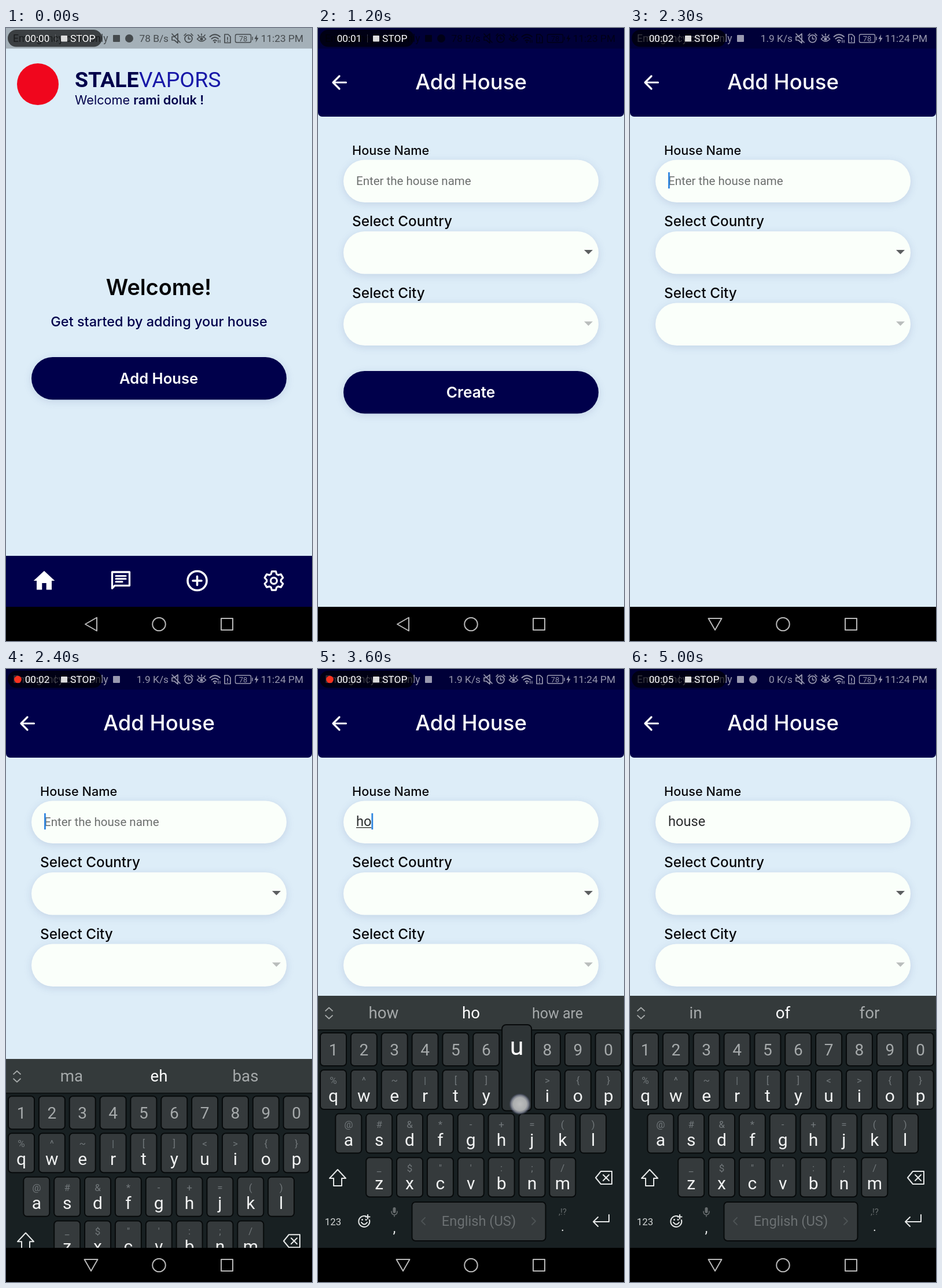
An HTML page that plays this animation: 529x1058 px, repeating every 5100 ms.

```html
<!DOCTYPE html>
<html lang="en">
<head>
<meta charset="utf-8">
<title>Add a house</title>
<style>
  html, body { margin: 0; width: 100%; height: 100%; overflow: hidden; background: #ddedf8; }
  svg { display: block; width: 529px; height: 1058px; }
  text { white-space: pre; }
  .ui { font-family: Inter, "Open Sans", sans-serif; }
  .ro { font-family: Roboto, "Noto Sans", sans-serif; }
  .mid { text-anchor: middle; }
  .end { text-anchor: end; }
  .w5 { font-weight: 500; }
  .w6 { font-weight: 600; }
  .w7 { font-weight: 700; }
  .line { fill: none; stroke-linecap: round; stroke-linejoin: round; }
  .shade { filter: drop-shadow(0 3px 7px rgba(20, 30, 110, .12)); }
</style>
</head>
<body>
<svg id="stage" viewBox="0 0 529 1058"></svg>
<script>
const LOOP = 5100, STEP = 100;
const NAVY = '#00004b', SKY = '#ddedf8', PAPER = '#fafffa';

const esc = s => s.replace(/&/g, '&amp;').replace(/</g, '&lt;');
const text = (s, x, y, size, cls, fill) =>
  `<text x="${x}" y="${y}" font-size="${size}" class="${cls}" fill="${fill}">${esc(s)}</text>`;
const rect = (x, y, w, h, r, fill, more = '') =>
  `<rect x="${x}" y="${y}" width="${w}" height="${h}" rx="${r}" fill="${fill}" ${more}/>`;
const disc = (x, y, r, fill) => `<circle cx="${x}" cy="${y}" r="${r}" fill="${fill}"/>`;
const line = (d, color, w = 2) => `<path class="line" d="${d}" stroke="${color}" stroke-width="${w}"/>`;
const ring = (x, y, r, color, w) =>
  `<circle class="line" cx="${x}" cy="${y}" r="${r}" stroke="${color}" stroke-width="${w}"/>`;

const pill = (y, fill) => rect(44, y, 441, 73.5, 36.7, fill, 'class="shade"');

// Six-toothed cog outline
function cog(cx, cy) {
  const pts = [];
  for (let i = 0; i < 6; i++)
    for (const [off, r] of [[-23, 12.4], [-12, 16.6], [12, 16.6], [23, 12.4]]) {
      const a = (i * 60 - 90 + off) * Math.PI / 180;
      pts.push((cx + r * Math.cos(a)).toFixed(1) + ' ' + (cy + r * Math.sin(a)).toFixed(1));
    }
  return line('M' + pts.join('L') + 'Z', '#fff', 3.2) + ring(cx, cy, 5.4, '#fff', 3.2);
}

function homePage() {
  return rect(0, 0, 529, 1000, 0, SKY) +
    disc(55, 97, 36, '#f0061d') +
    `<text x="119" y="102" font-size="37.5" class="ro" fill="${NAVY}"><tspan class="w7">STALE</tspan><tspan fill="#1818a8">VAPORS</tspan></text>` +
    `<text x="119" y="132" font-size="21.7" class="ui" fill="${NAVY}">Welcome <tspan class="w6">rami doluk !</tspan></text>` +
    text('Welcome!', 264, 461, 37.8, 'ui w6 mid', '#050508') +
    text('Get started by adding your house', 264.5, 515, 23.5, 'ui w5 mid', NAVY) +
    `<g id="addBtn">${pill(568, NAVY)}${text('Add House', 264, 614, 25.6, 'ui w6 mid', '#fff')}</g>` +
    rect(0, 911, 529, 88, 0, NAVY) +
    '<path d="M66 937L84.300 954H79V969.500H69.700V958H62.300V969.500H53V954H47.700Z" fill="#fff"/>' +
    line('M183.500 967V939H213.500V962.300H188Z', '#fff', 3.3) +
    line('M190 945.700H207M190 950.700H207M190 955.700H201', '#fff', 3.1) +
    ring(330.5, 954, 16.5, '#fff', 3.6) + line('M330.500 946.500V961.500M323 954H338', '#fff', 3.6) +
    cog(463, 954);
}

function formPage() {
  const label = (s, y, size) => text(s, 59, y, size, 'ui w5', '#08080c');
  const arrow = (y, c) => `<path d="M460 ${y}h15l-7.500 7.500z" fill="${c}"/>`;
  return rect(0, 0, 529, 1000, 0, SKY) + rect(0, -10, 529, 163, 7, NAVY) +
    line('M48.500 94H27M37 83L26 94L37 105', '#fff', 3.2) +
    text('Add House', 264.5, 106, 36.5, 'ui w5 mid', '#fff') +
    label('House Name', 219, 21.7) + pill(227.5, PAPER) +
    label('Select Country', 342, 24.3) + pill(351, PAPER) + arrow(383, '#5c5f60') +
    label('Select City', 466, 24.3) + pill(474.5, PAPER) + arrow(506.5, '#b9bdbc') +
    '<g id="field"></g>' +
    `<g id="createBtn">${pill(592, NAVY)}${text('Create', 264, 638, 26.2, 'ui w6 mid', '#fff')}</g>`;
}

const ROWS = [
  { keys: '1234567890', subs: '', x: 26.5, y: 628, h: 57 },
  { keys: 'qwertyuiop', subs: '%^~|[]<>{}', x: 26.5, y: 692, h: 68 },
  { keys: 'asdfghjkl', subs: '@#&*-+=()', x: 52.8, y: 767.6, h: 68 },
  { keys: 'zxcvbnm', subs: '_$"\':;/', x: 105.7, y: 843.2, h: 68 }
];
const PITCH = 52.85;
const keyBox = (x, y, w, h) => rect(x, y, w, h, 6, '#353a3c', 'stroke="#070a0b" stroke-width="2"');

function keyboard() {
  let out = rect(0, 564, 529, 436, 0, '#182022') + rect(0, 564, 529, 59, 0, '#343a3b') +
    rect(0, 622, 529, 2, 0, '#0c1011') +
    line('M13 590L19 584.500L25 590M13 598L19 603.500L25 598', '#a4a8a8', 1.8);
  for (const row of ROWS)
    [...row.keys].forEach((k, i) => {
      const x = row.x + i * PITCH;
      out += keyBox(x - 22.5, row.y, 45, row.h);
      if (row.subs)
        out += text(row.subs[i], x, row.y + 24, 17, 'ro mid', '#71777a') +
          text(k, x, row.y + 55, 30, 'ro mid', '#f2f3f3');
      else out += text(k, x, row.y + 39, 28, 'ro mid', '#a6aaab');
    });
  const pale = '#e6e8e8', dim = '#676c6e';
  return out + keyBox(162.5, 920, 231, 67) +
    text('English (US)', 278, 961, 23.7, 'ro mid', '#6b7072') +
    line('M185 947L179 953L185 959M370 947L376 953L370 959', '#4d5355', 1.8) +
    line('M34 864L48 879H41V892H27V879H20Z', pale) +
    line('M480 878L489 867H508V889H489ZM493 873L503 883M503 873L493 883', pale) +
    line('M503 942V954H476M484 946L476 954L484 962', pale) +
    text('123', 26, 960, 16.8, 'ro mid', '#d2d5d5') +
    line('M83 944.500A9.500 9.500 0 1 0 89 951M75 955Q80 962 85 955M86 942V949M82.500 945.500H89.500', pale) +
    disc(76.5, 950.5, 1.5, pale) + disc(83, 950.5, 1.5, pale) +
    rect(129.5, 929, 5, 10, 2.5, dim) + line('M127 936Q127 942 132 942T137 936M132 942V945', dim, 1.6) +
    text(',', 132, 973, 25, 'ro mid', pale) +
    text(',!?', 423, 942, 15, 'ro mid', dim) + text('.', 423, 970, 22, 'ro mid', pale) +
    '<g id="words"></g><g id="popup"></g>';
}

function statusIcons() {
  const c = 'currentColor';
  return line('M287 15H291L297 10V26L291 21H287ZM287 10L301 25', c, 1.7) +
    ring(315.5, 18.5, 6.4, c, 1.8) + line('M315.500 15V19H318.500M308 13L311 10M323 13L320 10', c, 1.7) +
    line('M330.500 19Q338 11 345.500 19Q338 27 330.500 19M332 12L334 14.500M338 10V12.500M344 12L342 14.500', c, 1.7) + disc(338, 19, 2.6, c) +
    line('M352.500 15Q361 7.500 370 15M355.500 18.500Q361 13.500 367 18.500M358.500 22Q361 19.500 364 22', c, 1.9) +
    disc(361, 24.5, 1.5, c) + line('M367 21V25M370 21V25', c, 1.3) +
    line('M378 11H384L388 15V25.500H378ZM383 16V20M383 22.700V23', c, 1.7) +
    line('M399 11H421Q423.500 11 423.500 13.500V22.500Q423.500 25 421 25H399Q396.500 25 396.500 22.500V13.500Q396.500 11 399 11M426 15.500V20.500', c, 1.4) +
    text('78', 410, 23, 13, 'ro mid', c) +
    `<path d="M434 11L429.500 19H432.500L431.500 25L436.500 17H433.500Z" fill="${c}"/>` +
    rect(185, 12, 12, 12, 1, c);
}

const stage = document.getElementById('stage');
stage.innerHTML =
  `<defs><radialGradient id="tip">
     <stop offset="0" stop-color="#c9caca" stop-opacity=".92"/>
     <stop offset=".62" stop-color="#b9bbbc" stop-opacity=".9"/>
     <stop offset=".8" stop-color="#9599a6" stop-opacity=".75"/>
     <stop offset="1" stop-color="#6a70a0" stop-opacity="0"/>
   </radialGradient></defs>` +
  `<g>${homePage()}</g><g id="form">${formPage()}</g><g id="kb">${keyboard()}</g>` +
  rect(0, 0, 529, 35.5, 0, 'rgba(0,0,0,.26)') +
  `<g id="status">${text('Emergency calls only', 12, 24, 17.6, 'ro', 'currentColor')}${statusIcons()}<g id="net"></g></g>` +
  rect(3, 3, 163, 29.5, 14.7, 'rgba(0,0,0,.64)') +
  rect(85, 11, 1, 14, 0, 'rgba(255,255,255,.22)') + rect(95, 13, 11, 10.5, 1, '#dcdcdc') +
  text('STOP', 111, 24, 17.4, 'ro', '#fff') +
  '<g id="rec"></g>' +
  rect(0, 999, 529, 59, 0, '#000') + '<g id="back"></g>' +
  ring(264.5, 1029, 11.3, '#b8b8b8', 2) + line('M372 1019H392V1039H372Z', '#b8b8b8', 2) +
  '<circle id="touch" r="18.500" fill="url(#tip)"/>';

const ui = {};
for (const id of ['addBtn', 'form', 'field', 'createBtn', 'kb', 'words', 'popup', 'status', 'net', 'rec', 'back', 'touch'])
  ui[id] = document.getElementById(id);

const within = (t, a, b) => t >= a && t < b;
const ramp = (t, a, b) => Math.min(1, Math.max(0, (t - a) / (b - a)));
const lastOf = (list, t) => list.filter(e => e[0] <= t).pop();
const show = (node, on) => node.setAttribute('visibility', on ? 'visible' : 'hidden');

// [from, until, x, y, key]
const TOUCHES = [
  [800, 1000, 291, 612], [1900, 2100, 230, 268],
  [2800, 3000, 308, 804, 'h'], [3300, 3500, 446, 742, 'o'], [3600, 3700, 349, 751, 'u'],
  [3800, 4000, 102, 812, 's'], [4100, 4300, 127, 737, 'e'], [4400, 4600, 268, 950]
];
const TYPED = [[0, ''], [3000, 'h'], [3500, 'ho'], [3700, 'hou'], [4000, 'hous'], [4300, 'house'], [4600, 'house ']];
const WORDS = [
  [0, 'ma', 'eh', 'bas'], [3000, 'he', 'h', 'how'], [3500, 'how', 'ho', 'how are'],
  [3700, 'hour', 'hou', 'house'], [4000, 'Houston', 'house', 'houses'],
  [4300, 'houses', 'house', 'housed'], [4600, 'in', 'of', 'for']
];
const TICKS = [[0], [800], [1800], [2800], [3800], [4800]];
const REC_ON = [300, 1400, 2400, 3400, 4400];
const CARET_ON = [[2200, 2800], [3000, 3400], [3500, 5000]];
const ADVANCE = { h: 13, o: 13.4, u: 13, s: 12.1, e: 12.5, ' ': 5.8 };

function popup(key) {
  const row = ROWS.find(r => r.keys.includes(key));
  const x = row.x + row.keys.indexOf(key) * PITCH;
  return rect(x - 25.5, row.y - 78, 51, 148.5, 7, '#2e3436', 'stroke="#070a0b" stroke-width="2"') +
    text(key, x, row.y - 26, 43, 'ro mid', '#fff');
}

function field(t) {
  const s = lastOf(TYPED, t)[1];
  const w = [...s].reduce((sum, ch) => sum + ADVANCE[ch], 0);
  let out = s ? text(s, 66, 271, 23.6, 'ro', '#2b2d2e')
              : text('Enter the house name', 66, 271, 20.5, 'ro', '#6c6f6e');
  if (s && t < 4600) out += rect(66, 273, w, 1.4, 0, '#333');
  if (CARET_ON.some(c => within(t, ...c))) out += rect(66 + w, 249, 2.8, 28, 0, '#2f86e0');
  return out;
}

// The middle word is heavier when it completes what was typed
function words(t) {
  const typed = lastOf(TYPED, t)[1];
  return lastOf(WORDS, t).slice(1).map((w, i) => {
    const heavy = i === 1 && typed && w !== typed && w.startsWith(typed);
    return text(w, [113.5, 264.5, 414][i], 603, w.length > 6 ? 25 : 27.7,
      heavy ? 'ro mid w5' : 'ro mid', i === 1 ? '#fff' : '#a5a9aa');
  }).join('');
}

function draw(t) {
  const enter = ramp(t, 900, 1200);
  ui.addBtn.setAttribute('opacity', t >= 900 && t < 1000 ? .45 : 1);
  show(ui.form, enter > 0);
  ui.form.setAttribute('opacity', enter);
  ui.form.setAttribute('transform', `translate(0 ${80 * (1 - enter) ** 2})`);
  ui.field.innerHTML = field(t);
  show(ui.createBtn, enter > 0 && t < 2300);

  const rise = ramp(t, 2300, 2500);
  show(ui.kb, rise > 0);
  ui.kb.setAttribute('transform', `translate(0 ${437 * (1 - rise) ** 2})`);
  ui.words.innerHTML = words(t);

  const hit = TOUCHES.find(p => within(t, p[0], p[1]));
  ui.popup.innerHTML = hit && hit[4] ? popup(hit[4]) : '';
  show(ui.touch, hit);
  if (hit) ui.touch.setAttribute('transform', `translate(${hit[2]} ${hit[3]})`);

  ui.status.setAttribute('color', t < 1300 ? 'rgba(0,0,0,.58)' : 'rgba(255,255,255,.6)');
  const speed = t < 1800 ? '78 B/s' : t < 4800 ? '1.9 K/s' : '0 K/s';
  ui.net.innerHTML = text(speed, 281, 24, 17.3, 'ro end', 'currentColor') +
    text(t < 1800 ? '11:23 PM' : '11:24 PM', 514, 24, 17.3, 'ro end', 'currentColor') +
    (speed === '1.9 K/s' ? '' : disc(213, 18, 7, 'currentColor'));

  const sec = TICKS.filter(k => k[0] <= t).length - 1;
  const dot = REC_ON.some((a, i) => within(t, a, TICKS[i + 1][0]));
  ui.rec.innerHTML = text('00:0' + sec, 54, 24, 17.1, 'ro mid', '#fff') + (dot ? disc(20.5, 18, 6.3, '#f8321f') : '');
  ui.back.innerHTML = line(t < 2300 ? 'M157 1017.500V1040.500L137 1029Z' : 'M135.500 1019H158.500L147 1039Z', '#b8b8b8', 2);
}

let shown = -1;
const start = performance.now();
function tick(now) {
  const t = Math.floor(Math.max(0, now - start) % LOOP / STEP) * STEP;
  if (t !== shown) draw(shown = t);
  requestAnimationFrame(tick);
}
draw(0);
requestAnimationFrame(tick);
</script>
</body>
</html>
```
